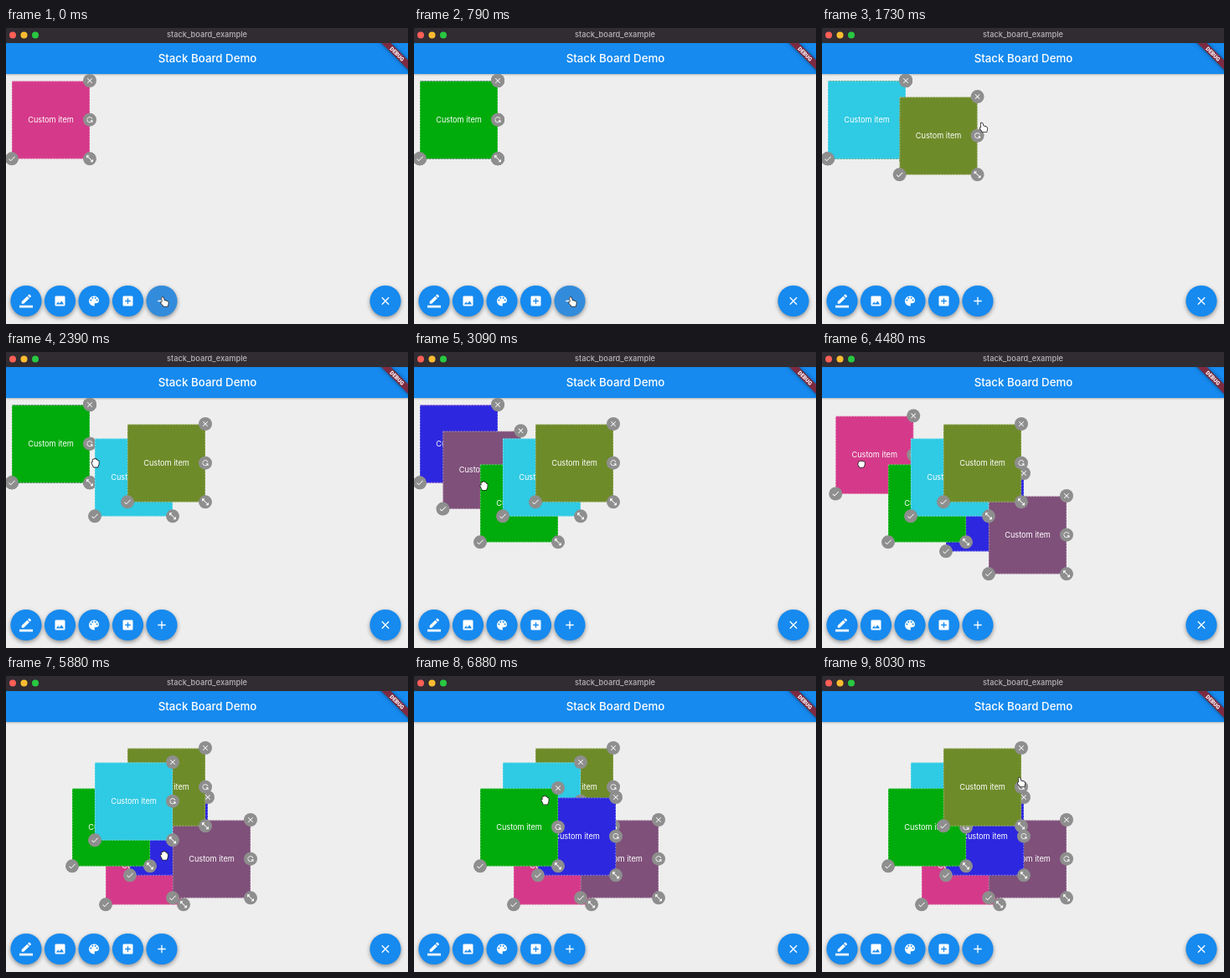
These frames come from a looping animation (480x354 px, 8.15 s). An HTML page with a canvas:

```html
<!DOCTYPE html>
<html lang="en">
<head>
<meta charset="utf-8">
<title>Stack Board Demo</title>
<style>
html, body { margin: 0; width: 100%; height: 100%; overflow: hidden; background: #eee; }
canvas { display: block; width: 480px; height: 354px; }
</style>
</head>
<body>
<canvas id="stage"></canvas>
<script>
const LOOP = 8150, SIZE = 93, BLUE = '#168aef';
const canvas = document.getElementById('stage');
const ctx = canvas.getContext('2d');
const ratio = window.devicePixelRatio || 1;
canvas.width = 480 * ratio;
canvas.height = 354 * ratio;

const dot = (x, y) => `M${x - 1.5} ${y}a1.5 1.5 0 1 0 3 0a1.5 1.5 0 1 0-3 0z`;
const icons = {
  pen: 'M17.75 7L14 3.25l-10 10V17h3.75l10-10zm2.96-2.96c.39-.39.39-1.02 0-1.41L18.37.29c-.39-.39-1.02-.39-1.41 0L15 2.25 18.75 6l1.96-1.96zM0 20h24v4H0z',
  image: 'M21 19V5a2 2 0 0 0-2-2H5a2 2 0 0 0-2 2v14a2 2 0 0 0 2 2h14a2 2 0 0 0 2-2zM8.5 13.5l2.5 3L14.5 12l4.5 6H5z',
  palette: 'M12 3a9 9 0 1 0 0 18c1 0 1.5-.7 1.5-1.5 0-1-.8-1.2-.8-2 0-.8.7-1.5 1.5-1.5H16a5 5 0 0 0 5-5c0-4.4-4-8-9-8z'
    + dot(6.5, 10.5) + dot(9.5, 6.5) + dot(14.5, 6.5) + dot(17.5, 10.5),
  addBox: 'M19 3H5a2 2 0 0 0-2 2v14a2 2 0 0 0 2 2h14a2 2 0 0 0 2-2V5a2 2 0 0 0-2-2zm-2 10h-4v4h-2v-4H7v-2h4V7h2v4h4z',
  add: 'M19 13h-6v6h-2v-6H5v-2h6V5h2v6h6z',
  close: 'M19 6.4L17.6 5 12 10.6 6.4 5 5 6.4 10.6 12 5 17.6 6.4 19 12 13.4 17.6 19 19 17.6 13.4 12z',
  check: 'M9 16.2L4.8 12l-1.4 1.4L9 19 21 7l-1.4-1.4z',
  rotate: 'M17.65 17.65A8 8 0 1 1 19.73 10h-2.08A6 6 0 1 0 16.22 16.22L13 13h7v7z',
  resize: 'M3 11V3h8L7.7 6.3l10 10L21 13v8h-8l3.3-3.3-10-10z'
};
const cursors = {
  point: 'M-3.4-5q1.3-1.2 2 .4l1 3 3.2.8q1.7.5 1.5 2.4l-.8 3.6h-4.8l-3-3.8q-.6-1.6 1.4-1.1z',
  open: 'M-4.4-.6q1-1.2 1.8 0l-.6-3q.9-1.4 1.7-.1l.4-1q1-1 1.7.1l.4.7q1-.7 1.5.5l.4.9q1-.4 1.3.7l-.3 3.6-1.2 3h-4.6z',
  grab: 'M-3.6-1.4q.2-1.8 1.8-1.7 1-1 2 0 1-.8 1.9.2 1.6-.2 1.6 1.4l-.3 2.8-1.2 2.2h-4.4l-1.8-2.8z'
};
for (const set of [icons, cursors])
  for (const name in set) set[name] = new Path2D(set[name]);

// path: [time, x, y]; raised: when a tap brings the item to the front
const items = [
  { color: '#d53a8a', born: 0, path: [[4420, 7, 63], [4480, 16, 76], [4950, 119, 180]] },
  { color: '#2d27df', born: 270, raised: 6000, path: [[3760, 7, 63], [4200, 148, 145]] },
  { color: '#7f507a', born: 520, path: [[3030, 7, 63], [3090, 34, 94], [3270, 120, 136], [3420, 199, 172]] },
  { color: '#00ab0c', born: 770, raised: 6550, path: [[2500, 7, 63], [2850, 79, 134]] },
  { color: '#2fcae3', born: 1010, raised: 5300, path: [[2000, 7, 63], [2330, 106, 103]] },
  { color: '#6e8b29', born: 1230, raised: 7100, path: [[1610, 7, 63], [1730, 92, 82], [1820, 145, 86]] }
];
// [time, x, y, shape]
const pointer = [
  [0, 189.5, 327.5, 'point'], [1260, 189.5, 327.5, 'open'], [1450, 58, 88, 'open'], [1610, 58, 88, 'grab'],
  [1730, 193, 119, 'point'], [1850, 198, 113, 'open'], [2000, 45, 100, 'grab'], [2330, 144, 140, 'open'],
  [2500, 40, 120, 'grab'], [2850, 112, 191, 'open'], [3030, 56, 129, 'open'], [3090, 83, 160, 'open'],
  [3270, 169, 202, 'grab'], [3420, 248, 238, 'open'], [3610, 40, 130, 'open'], [3760, 40, 130, 'grab'],
  [4200, 181, 212, 'open'], [4400, 38, 121, 'grab'], [4420, 38, 121, 'grab'], [4480, 47, 134, 'grab'],
  [4950, 150, 238, 'open'], [5200, 150, 160, 'open'], [5420, 150, 160, 'open'], [5640, 189, 212, 'open'],
  [5880, 189, 215, 'open'], [6210, 189, 215, 'open'], [6500, 110, 190, 'open'], [6700, 110, 190, 'open'],
  [7050, 200, 110, 'open'], [7520, 200, 110, 'open'], [7820, 238, 127, 'point']
];

function along(path, t) {
  const next = path.findIndex(key => key[0] > t);
  if (next === 0) return path[0].slice(1);
  if (next < 0) return path[path.length - 1].slice(1);
  const a = path[next - 1], b = path[next], k = (t - a[0]) / (b[0] - a[0]);
  return [a[1] + (b[1] - a[1]) * k, a[2] + (b[2] - a[2]) * k, a[3]];
}

function rect(x, y, w, h, color) {
  ctx.fillStyle = color;
  ctx.fillRect(x, y, w, h);
}

function circle(x, y, r, color) {
  ctx.fillStyle = color;
  ctx.beginPath();
  ctx.arc(x, y, r, 0, 7);
  ctx.fill();
}

function text(label, x, y, font, color = '#fff') {
  ctx.font = font + ', sans-serif';
  ctx.fillStyle = color;
  ctx.textAlign = 'center';
  ctx.textBaseline = 'middle';
  ctx.fillText(label, x, y);
}

function icon(name, x, y, size) {
  ctx.save();
  ctx.translate(x - size / 2, y - size / 2);
  ctx.scale(size / 24, size / 24);
  ctx.fillStyle = '#fff';
  ctx.fill(icons[name], 'evenodd');
  ctx.restore();
}

function shadowed(blur, offset, alpha, draw) {
  ctx.save();
  ctx.shadowColor = `rgba(0,0,0,${alpha})`;
  ctx.shadowBlur = blur * ratio;
  ctx.shadowOffsetY = offset * ratio;
  draw();
  ctx.restore();
}

function button(name, x, color = BLUE) {
  shadowed(5, 2, .4, () => circle(x, 326.5, 18.6, color));
  icon(name, x, 326.5, 16);
}

function handle(name, x, y) {
  circle(x, y, 8, '#8e8e8e');
  icon(name, x, y, 10.5);
}

function drawItem(item, t) {
  const [x, y] = along(item.path, t);
  rect(x, y + .5, SIZE, SIZE, item.color);
  ctx.strokeStyle = 'rgba(255,255,255,.55)';
  ctx.lineWidth = .7;
  ctx.setLineDash([2, 1.5]);
  ctx.strokeRect(x + .3, y + .8, SIZE - .6, SIZE - .6);
  ctx.setLineDash([]);
  text('Custom item', x + 46.5, y + 47.5, '9.2px Inter');
  handle('close', x + SIZE, y);
  handle('rotate', x + SIZE, y + 46.7);
  handle('resize', x + SIZE, y + SIZE + .3);
  handle('check', x, y + SIZE + .3);
}

function drawBanner() {
  ctx.save();
  ctx.translate(480, 18);
  ctx.rotate(Math.PI / 4);
  shadowed(4, 0, .5, () => rect(-27, 14.5, 54, 8, '#7c2b40'));
  text('DEBUG', 0, 18.8, '900 6.6px Roboto');
  ctx.restore();
}

function drawCursor([x, y, shape]) {
  ctx.save();
  ctx.translate(x, y);
  ctx.lineJoin = 'round';
  ctx.lineWidth = 1.6;
  ctx.strokeStyle = '#222';
  ctx.stroke(cursors[shape]);
  ctx.fillStyle = '#fff';
  ctx.fill(cursors[shape]);
  ctx.restore();
}

function draw(t) {
  ctx.setTransform(ratio, 0, 0, ratio, 0, 0);
  rect(0, 0, 480, 354, '#eee');
  shadowed(2, 1, .25, () => rect(0, 18, 480, 37, BLUE));
  text('Stack Board Demo', 240.5, 37, '500 13.3px Inter');

  const depth = item => t >= item.raised ? item.raised : item.born;
  items.filter(item => t >= item.born)
    .sort((a, b) => depth(a) - depth(b))
    .forEach(item => drawItem(item, t));

  ['pen', 'image', 'palette', 'addBox'].forEach((name, i) => button(name, 24 + i * 40.5));
  button('add', 186, t < 1290 ? '#338cdb' : BLUE);
  button('close', 453);

  drawBanner();
  rect(0, 0, 480, 18, '#302c32');
  ['#ff5f57', '#febc2e', '#28c840'].forEach((color, i) => circle(8 + i * 13.5, 8.5, 4, color));
  text('stack_board_example', 240, 8.5, '500 9.25px Inter', '#b8b5b9');
  drawCursor(along(pointer, t));
}

const start = performance.now();
function tick() {
  draw((performance.now() - start) % LOOP);
  requestAnimationFrame(tick);
}
tick();
</script>
</body>
</html>
```
